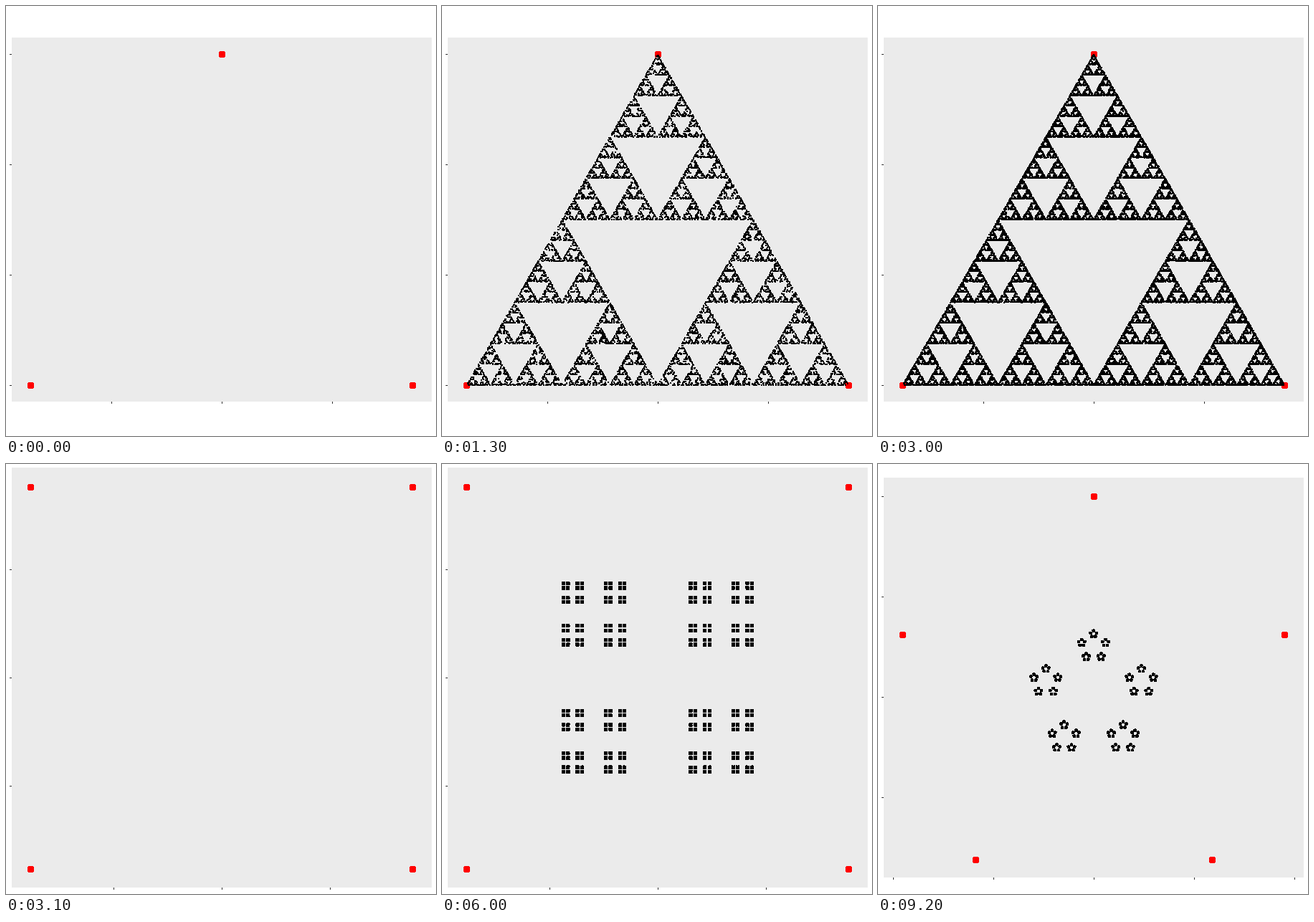
Animation, 600 px wide and 600 px high, one loop 9300 ms. Source, as a matplotlib script:

```python
import math

import matplotlib.pyplot as plt
import numpy as np
from matplotlib.animation import FuncAnimation
from matplotlib.patches import Circle, Rectangle

SIZE = 600
STEPS = 31          # frames per polygon; the first one has no dots
PER_STEP = 1000     # dots added in each frame
LEFT, RIGHT, TOP, BOTTOM = 8.24, 594.52, 5.48, 591.76
MID_X, MID_Y = (LEFT + RIGHT) / 2, (TOP + BOTTOM) / 2
TICK = 3

fig = plt.figure(figsize=(6, 6), dpi=100, facecolor="white")
ax = fig.add_axes([0, 0, 1, 1])
ax.set_xlim(0, SIZE)
ax.set_ylim(SIZE, 0)
ax.axis("off")


def box(x0, y0, x1, y1, color):
    return ax.add_patch(Rectangle((x0, y0), x1 - x0, y1 - y0, fc=color,
                                  lw=0, antialiased=False))


def chaos_game(corners, rng):
    """Jump to (point + random corner) / (n - 1), skipping the first jumps."""
    n = len(corners)
    warmup = 20
    picks = rng.integers(n, size=(STEPS - 1) * PER_STEP + warmup)
    x = y = 0.0
    points = []
    for cx, cy in corners[picks].tolist():
        x, y = (x + cx) / (n - 1), (y + cy) / (n - 1)
        points.append((x, y))
    return np.array(points[warmup:])


class Scene:
    def __init__(self, sides, start, breaks_x, breaks_y, rng):
        angles = math.radians(start) + 2 * np.pi * np.arange(sides) / sides
        corners = np.column_stack([np.cos(angles), np.sin(angles)])
        low, high = corners.min(axis=0), corners.max(axis=0)
        self.scale = (RIGHT - LEFT) / 1.1 / (high[0] - low[0])
        self.zero_y = MID_Y + self.scale * (high[1] + low[1]) / 2

        half = 0.55 * self.scale * (high[1] - low[1])
        x0, x1 = int(LEFT), int(RIGHT)
        y0, y1 = int(MID_Y - half), int(MID_Y + half)
        self.artists = [box(x0, y0, x1, y1, "#EBEBEB")]
        for b in breaks_x:
            px = self.pixel(b, 0)[0]
            self.artists.append(box(px, y1, px + 1, y1 + TICK, "#333333"))
        for b in breaks_y:
            py = self.pixel(0, b)[1]
            self.artists.append(box(x0 - TICK, py, x0, py + 1, "#333333"))
        for x, y in corners:
            px, py = self.pixel(x, y)
            disc = Circle((px + 0.5, py + 0.5), 4.5, fc="red", lw=0,
                          antialiased=False, snap=False)
            self.artists.append(ax.add_patch(disc))

        # born[row, col] is the step at which a pixel turns black
        self.born = np.full((SIZE, SIZE), STEPS)
        points = chaos_game(corners, rng)
        px, py = self.pixel(points[:, 0], points[:, 1])
        step = 1 + np.arange(len(points)) // PER_STEP
        for dx in (-1, 0):
            for dy in (-1, 0):
                np.minimum.at(self.born, (py + dy, px + dx), step)

    def pixel(self, x, y):
        px = np.floor(MID_X + self.scale * x + 1e-6)
        py = np.floor(self.zero_y - self.scale * y + 1e-6)
        return px.astype(int), py.astype(int)


rng = np.random.default_rng(7)
halves = [-0.5, 0, 0.5, 1]
scenes = [
    Scene(3, 90, [-0.5, 0, 0.5], halves, rng),
    Scene(4, 45, [-0.4, 0, 0.4], [-0.4, 0, 0.4], rng),
    Scene(5, 90, [-1] + halves, halves, rng),
]
rgba = np.zeros((SIZE, SIZE, 4), dtype=np.uint8)
dots = ax.imshow(rgba, extent=(0, SIZE, SIZE, 0), aspect="auto",
                 interpolation="nearest", zorder=3)


def draw(frame):
    current, step = divmod(frame, STEPS)
    for i, scene in enumerate(scenes):
        for artist in scene.artists:
            artist.set_visible(i == current)
    rgba[..., 3] = np.where(scenes[current].born <= step, 255, 0)
    dots.set_data(rgba)
    return [dots]


anim = FuncAnimation(fig, draw, frames=STEPS * len(scenes), interval=100,
                     init_func=lambda: draw(0), repeat=True, repeat_delay=0)
plt.show()
```
